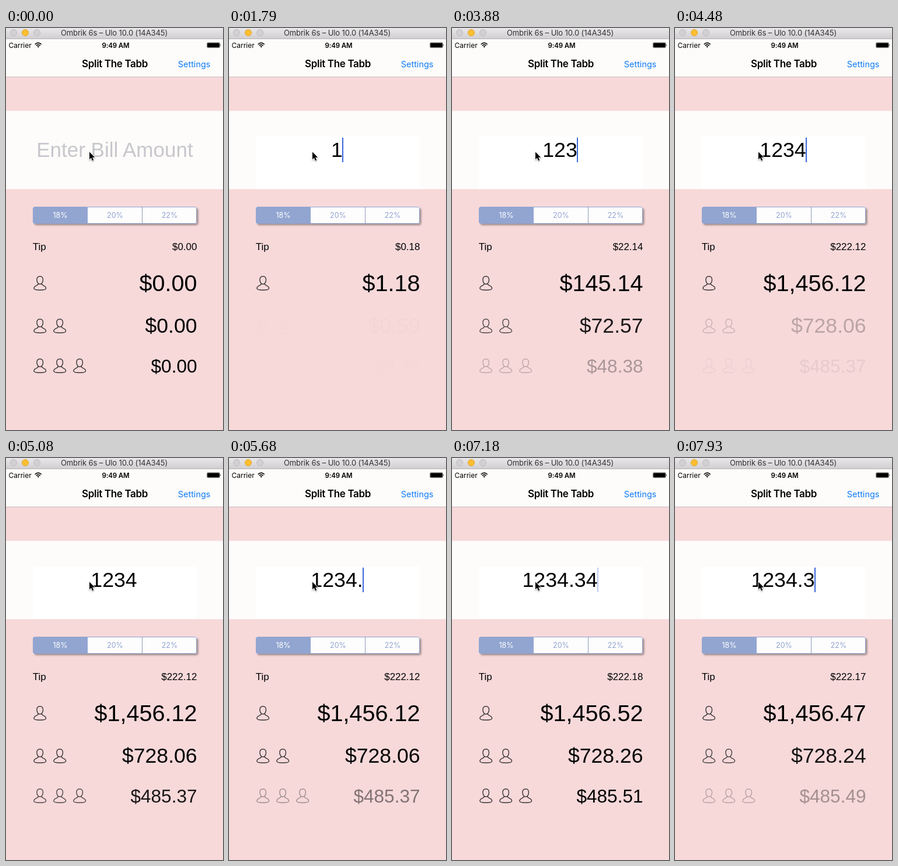
An HTML page that plays this animation: 372x686 px, repeating every 8000 ms.

```html
<!DOCTYPE html>
<html lang="en">
<head>
<meta charset="utf-8">
<title>Tip calculator</title>
<style>
  html, body { margin: 0; width: 100%; height: 100%; overflow: hidden; }
  svg { display: block; width: 372px; height: 686px; }
  text { font-family: "Liberation Sans", Arial, sans-serif; white-space: pre; }
  .ui { font-family: Inter, sans-serif; }
  .mid { text-anchor: middle; }
  .end { text-anchor: end; }
  .person { fill: none; stroke: #3a3535; stroke-width: 1.4; }
</style>
</head>
<body>
<svg viewBox="0 0 372 686">
  <defs>
    <linearGradient id="bar" x2="0" y2="1">
      <stop stop-color="#e9e7e9"/><stop offset="1" stop-color="#d1cfd1"/>
    </linearGradient>
    <filter id="shadow" x="-10%" y="-30%" width="120%" height="180%">
      <feDropShadow dx="2.5" dy="2.5" stdDeviation="1.8" flood-color="#000" flood-opacity=".36"/>
    </filter>
    <path id="person" class="person" d="M11.2 .8C7.5 .8 5.9 3.5 5.9 6.8C5.9 10.5 8.2 14 11.2 14S16.5 10.5 16.5 6.8 14.9 .8 11.2 .8Z
      M8.3 13C8.6 17.5 1 15.5 .8 21.3Q.8 24.2 11.2 24.2T21.6 21.3C21.4 15.5 13.8 17.5 14.1 13"/>
  </defs>

  <rect width="372" height="686" fill="#f7d9da"/>
  <rect width="372" height="83" fill="#fdfcfa"/>
  <rect y="83" width="372" height="1" fill="#c9b9b9"/>
  <rect y="141.4" width="372" height="133.6" fill="#fdfcfa"/>

  <!-- window title bar -->
  <rect width="372" height="18" fill="url(#bar)"/>
  <rect y="18" width="372" height="1" fill="#b5b3b5"/>
  <g fill="#d2d0d2" stroke="#bdbbbd">
    <circle cx="13" cy="8" r="5.5"/>
    <circle cx="33" cy="8" r="5.5" fill="#fdbe30" stroke="#e2a52b"/>
    <circle cx="53" cy="8" r="5.5"/>
  </g>
  <text class="ui mid" x="185.5" y="13" font-size="13" letter-spacing="-.1" fill="#333133">Ombrik 6s – Ulo 10.0 (14A345)</text>

  <!-- status bar -->
  <text class="ui" x="4.5" y="33.5" font-size="12">Carrier</text>
  <g fill="none" stroke="#000" stroke-width="1.6">
    <path d="M49.7 28Q55.2 22.8 60.7 28M51.8 30.2Q55.2 27 58.6 30.2"/>
    <path d="M53.4 31.5Q55.2 30 57 31.5L55.2 33.4Z" fill="#000" stroke="none"/>
  </g>
  <text class="ui mid" x="188" y="33.5" font-size="11.5" font-weight="600" letter-spacing="-.1">9:49 AM</text>
  <rect x="344.5" y="24.9" width="22" height="8.8" rx="1.8" fill="none" stroke="#555" stroke-width=".7"/>
  <rect x="345.2" y="25.6" width="20.6" height="7.4" rx="1"/>
  <path d="M367.4 27.5q1.8 1.8 0 3.6z"/>

  <!-- navigation bar -->
  <text class="ui mid" x="186.5" y="67" font-size="17" font-weight="600" letter-spacing="-.35">Split The Tabb</text>
  <text class="ui end" x="350.5" y="66.5" font-size="14.5" fill="#0f7bf6">Settings</text>

  <!-- bill amount -->
  <g id="placeholder" font-size="35" fill="#c7c7cd">
    <text class="mid" x="186.4" y="220">Enter Bill Amount</text>
  </g>
  <rect id="field" x="46" y="185" width="281" height="89" fill="#fff"/>
  <text id="bill" class="mid" x="185" y="220" font-size="35.7"></text>
  <rect id="caret" y="187" width="2" height="42" fill="#3c68d8"/>
  <path d="M143 211.5v12.8l2.9-2.7 2.2 4.8 2.1-.9-2.1-4.7h4z" stroke="#fff" stroke-width="1.6" paint-order="stroke"
    style="filter: drop-shadow(0 1px 1px rgba(0, 0, 0, .35))"/>

  <!-- percentages -->
  <rect x="46" y="305" width="281" height="29" rx="4" fill="#fdfdfd" filter="url(#shadow)"/>
  <path d="M140 305H50a4 4 0 0 0-4 4v21a4 4 0 0 0 4 4h90z" fill="#92a5d1"/>
  <rect x="46.5" y="305.5" width="280" height="28" rx="3.5" fill="none" stroke="#92a5d1"/>
  <path d="M233.5 305v29" stroke="#8f9ab5"/>
  <g font-size="12.5" fill="#92a5d1">
    <text class="ui mid" x="93" y="324" fill="#fff">18%</text>
    <text class="ui mid" x="187" y="324">20%</text>
    <text class="ui mid" x="280.5" y="324">22%</text>
  </g>

  <text x="45.7" y="379" font-size="16.9">Tip</text>
  <text id="tip" class="end" x="327.3" y="379" font-size="16.9"></text>
  <g id="shares"></g>
</svg>

<script>
const LOOP = 8000;
const RATE = 0.18;
const edits = [
  [1740, "1"], [2900, "12"], [3500, "123"], [4310, "1234"],
  [5200, "1234."], [5700, "1234.3"], [6140, "1234.34"], [7530, "1234.3"]
];
const rowStyles = [[423, 449, 39.6], [496, 520, 35.6], [564, 587.5, 31.6]]; // icon top, baseline, font size
const $ = id => document.getElementById(id);
const clamp = x => Math.max(0, Math.min(1, x));
const money = n => "$" + n.toLocaleString("en-US", { minimumFractionDigits: 2, maximumFractionDigits: 2 });

$("shares").innerHTML = rowStyles.map(([top, base, size], i) => {
  const people = Array.from({ length: i + 1 }, (_, k) => `<use href="#person" x="${47 + 34 * k}" y="${top}"/>`);
  return `<g>${people.join("")}<text class="end" x="327.6" y="${base}" font-size="${size}"></text></g>`;
}).join("");
const rows = [...$("shares").children];

// Cubic ease-in-out with control points (.42, 0) and (.58, 1)
function ease(x) {
  let lo = 0, hi = 1;
  for (let i = 0; i < 20; i++) {
    const u = (lo + hi) / 2, v = 1 - u;
    if (1.26 * v * v * u + 1.74 * v * u * u + u ** 3 < x) lo = u; else hi = u;
  }
  return lo * lo * (3 - 2 * lo);
}

function caretOpacity(age) {
  return age < 800 ? 1 - clamp((age - 500) / 180) : clamp((age - 980) / 180);
}

// The screen refreshes every 150 ms
function hold(t) {
  const offset = t < 1790 ? 0 : 130;
  return Math.floor((t - offset) / 150) * 150 + offset;
}

function draw(t) {
  const edit = edits.filter(e => e[0] <= t).pop();
  const [start, value] = edit || [160, ""];
  const age = t - start;
  const amount = parseFloat(value) || 0;
  const bill = $("bill");

  bill.textContent = value;
  $("placeholder").setAttribute("opacity", value ? 0 : 1);
  $("field").setAttribute("opacity", value ? 1 : 0);
  const caretX = value ? Math.round(185 + bill.getComputedTextLength() / 2 - 0.5) : 50;
  $("caret").setAttribute("x", caretX);
  $("caret").setAttribute("opacity", t < 450 ? 0 : caretOpacity(age));

  $("tip").textContent = money(amount * RATE);
  rows.forEach((row, i) => {
    row.lastChild.textContent = money(amount * (1 + RATE) / (i + 1));
    row.setAttribute("opacity", value && i ? ease(clamp(age / (500 * i))) : 1);
  });
}

const began = performance.now();
function tick() {
  draw(hold((performance.now() - began) % LOOP));
  requestAnimationFrame(tick);
}
tick();
</script>
</body>
</html>
```
